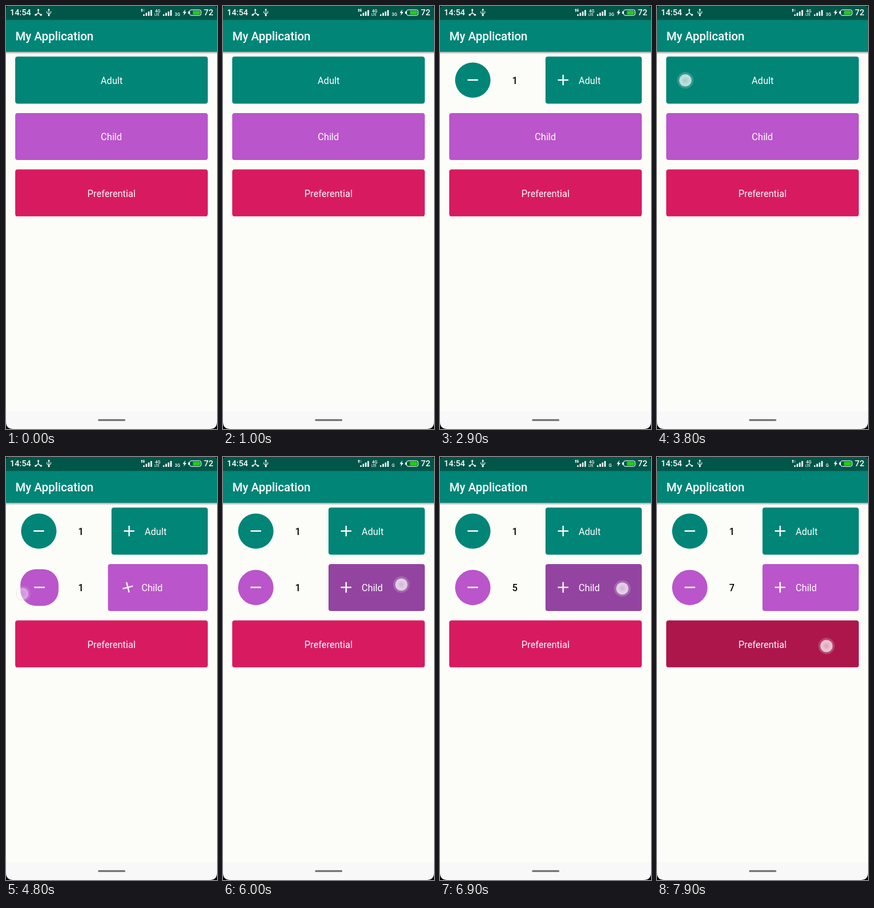
Recreate the animation shown at these times as an HTML page. Size 320 by 640 pixels, loop 8 s.

```html
<!DOCTYPE html>
<html lang="en">
<head>
<meta charset="utf-8">
<title>Ticket counters</title>
<style>
  html, body { margin: 0; width: 100%; height: 100%; overflow: hidden; background: #fcfdf8; }
  svg { display: block; width: 320px; height: 640px; }
  text { font-family: Roboto, "Open Sans", sans-serif; font-size: 14.22px; fill: #fff; }
  .bold { font-weight: 500; }
  .title { font-size: 17.78px; }
  .clock { font-size: 12.6px; }
  .tiny { font-size: 6.4px; }
  .count { fill: #000; font-weight: 500; text-anchor: middle; }
  .icon { fill: none; stroke: #fff; stroke-width: 2.1; }
</style>
</head>
<body>
<svg viewBox="0 0 320 640">
  <defs>
    <linearGradient id="shade" x1="0" y1="0" x2="0" y2="1">
      <stop offset="0" stop-color="#000" stop-opacity=".35"/>
      <stop offset="1" stop-color="#000" stop-opacity="0"/>
    </linearGradient>
    <radialGradient id="dot">
      <stop offset="0" stop-color="#fff" stop-opacity=".5"/>
      <stop offset=".7" stop-color="#fff" stop-opacity=".7"/>
      <stop offset="1" stop-color="#fff" stop-opacity=".64"/>
    </radialGradient>
  </defs>

  <rect width="320" height="640" fill="#fcfdf8"/>
  <rect y="613" width="320" height="27" fill="#f8f8f8"/>
  <rect x="139.5" y="625" width="41.5" height="3" rx="1.5" fill="#7b7b7b"/>
  <rect y="69" width="320" height="4" fill="url(#shade)"/>
  <rect y="20" width="320" height="49.3" fill="#008577"/>
  <rect width="320" height="21.2" fill="#005649"/>
  <text class="bold title" x="14.2" y="52">My Application</text>

  <g id="status" fill="#fff">
    <text class="bold clock" x="6" y="14.4">14:54</text>
    <path d="M49 5.5V10.5L45 13.5M49 10.5L53 13.5" fill="none" stroke="#fff" stroke-width="1.2"/>
    <circle cx="49" cy="6" r="1.4"/><circle cx="45" cy="13.3" r="1.5"/><circle cx="53" cy="13.3" r="1.5"/>
    <path d="M65 5V14M62 8V10.5L65 12.5L68 10.5V8" fill="none" stroke="#fff"/>
    <path d="M65 3.8L66.8 6.5H63.2Z"/><circle cx="65" cy="14" r="1.4"/>
    <path d="M206 4L207.8 6.3H206.6V9H205.4V6.3H204.2Z"/>
    <path id="down" d="M209 9L210.8 6.7H209.6V4H208.4V6.7H207.2Z"/>
    <text class="bold tiny" x="226" y="10">4G</text>
    <text class="bold" x="225.2" y="15" style="font-size:4.6px">LTE</text>
    <text class="bold tiny" id="net" x="256" y="15">3G</text>
    <path d="M272 5L268 10.5H270.4L269.4 14.6L273.6 9H271.2Z"/>
    <rect x="278.5" y="5.8" width="17.4" height="8.4" rx="2.4" fill="none" stroke="#fff"/>
    <rect x="276.3" y="8" width="1.8" height="4" rx=".8"/>
    <rect x="283.5" y="7.3" width="11" height="5.4" rx="1" fill="#22cf16"/>
    <text class="bold clock" x="300" y="14.4">72</text>
  </g>

  <g id="rows"></g>

  <g id="touch">
    <circle r="12.5" fill="#fff" fill-opacity=".18"/>
    <circle r="9.6" fill="url(#dot)" stroke="#667" stroke-opacity=".25"/>
  </g>

  <path d="M0 0H4Q0 0 0 4ZM320 0H316Q320 0 320 4ZM0 640V629Q0 640 11 640ZM320 640V629Q320 640 309 640Z" fill="#000"/>
</svg>

<script>
const LOOP = 8000, STEP = 100;
const LEFT = 14, RIGHT = 306, TOP = 76.6, PITCH = 85.33, HEIGHT = 71.1;
const $ = id => document.getElementById(id);
const mix = (a, b, p) => a + (b - a) * p;
const clamp = (v, lo = 0, hi = 1) => Math.min(hi, Math.max(lo, v));
// 300 ms cubic ease-out beginning at t0
const glide = (t, t0) => 1 - (1 - clamp((t - t0) / 300)) ** 3;

function set(el, attrs) {
  for (const key in attrs) el.setAttribute(key, attrs[key]);
}
function add(parent, tag, attrs, content = "") {
  const el = document.createElementNS("http://www.w3.org/2000/svg", tag);
  set(el, attrs);
  el.textContent = content;
  return parent.appendChild(el);
}

// signal bars
for (const x0 of [208, 238])
  for (let i = 0; i < 4; i++) {
    const h = 2.6 + i * 2.1;
    add($("status"), "rect", { x: x0 + i * 3.7, y: 15 - h, width: 2.3, height: h, rx: .7 });
  }

class Row {
  constructor(index, label, textX, color, dark) {
    const y = TOP + index * PITCH, mid = y + HEIGHT / 2;
    Object.assign(this, { y, mid, textX, color, dark });
    const g = add($("rows"), "g", {});
    this.count = add(g, "text", { class: "count", x: 113.5, y: mid + 5.8 });
    this.minus = add(g, "rect", { fill: color });
    this.dash = add(g, "path", { class: "icon", d: "M-8 0H8" });
    this.main = add(g, "rect", { y, height: HEIGHT, rx: 3.6 });
    this.plus = add(g, "path", { class: "icon", d: "M-8 0H8M0 -8V8" });
    this.label = add(g, "text", { y: mid + 5.7 }, label);
  }
  // open: 0 is one wide button, 1 is minus, count and plus
  draw(open, pressed, count = 1) {
    const { y, mid } = this, late = open ** 3.5, soft = open ** 2;
    const left = mix(LEFT, 160, open), inset = 8.9 * late;
    const mx = LEFT + inset, mr = mix(160, 76.6, open);
    const opacity = open > 0 ? 1 : 0;
    set(this.minus, { x: mx, y: y + inset, width: mr - mx, height: HEIGHT - 2 * inset, rx: mix(3.6, 26.7, late), opacity });
    set(this.dash, { transform: `translate(${(mx + mr) / 2} ${mid - .2})`, opacity: open });
    set(this.main, { x: left, width: RIGHT - left, fill: pressed ? this.dark : this.color });
    set(this.plus, { transform: `translate(${mix(160, 186.7, soft)} ${mid - .2}) rotate(${-200 * (1 - soft)})`, opacity: open });
    set(this.label, { x: mix(this.textX, 210.3, soft) });
    set(this.count, { opacity });
    this.count.textContent = count;
  }
}

const adult = new Row(0, "Adult", 143.6, "#008577", "#006a5f");
const child = new Row(1, "Child", 143.8, "#ba55cb", "#9344a0");
const pref = new Row(2, "Preferential", 123.5, "#d81b60", "#ad164b");

// each touch is held from..to, then fades; drift is its slide in px
const touches = [
  { from: 1900, to: 2200, x: 273, y: 115 },
  { from: 3100, to: 3100, x: 45, y: 113 },
  { from: 3800, to: 3800, x: 43, y: 112.5 },
  { from: 4700, to: 4700, x: 25, y: 207 },
  { from: 6000, to: 7150, x: 270.5, y: 193, drift: 6 },
  { from: 7700, to: LOOP, x: 257, y: 286 },
];

// six quick taps on the open child row
const taps = { from: 6000, every: 220, hold: 150, total: 6 };
function tapState(t) {
  const age = t - taps.from;
  const done = clamp(Math.floor((age - taps.hold) / taps.every) + 1, 0, taps.total);
  const down = age >= 0 && done < taps.total && age % taps.every < taps.hold;
  return { done, down };
}

function drawTouch(t) {
  const spot = touches.findLast(s => s.from <= t);
  if (!spot) return set($("touch"), { opacity: 0 });
  const { from, to, x, y, drift = 0 } = spot;
  const slide = drift * clamp((t - from) / 900);
  set($("touch"), { transform: `translate(${x + slide} ${y + slide})`, opacity: clamp(1 - (t - to) / 250) });
}

function draw(t) {
  const { done, down } = tapState(t);
  adult.draw(glide(t, 2200) - glide(t, 3100) + glide(t, 3800), t >= 1900 && t < 2300);
  child.draw(glide(t, 4600), down, 1 + done);
  pref.draw(0, t >= 7700);
  drawTouch(t);
  set($("down"), { opacity: Math.floor((t + 600) / 1000) % 2 ? 1 : .3 });
  $("net").textContent = t < 6000 ? "3G" : "G";
}

const start = performance.now();
function tick() {
  const t = (performance.now() - start) % LOOP;
  draw(Math.floor(t / STEP) * STEP);
  requestAnimationFrame(tick);
}
tick();
</script>
</body>
</html>
```
